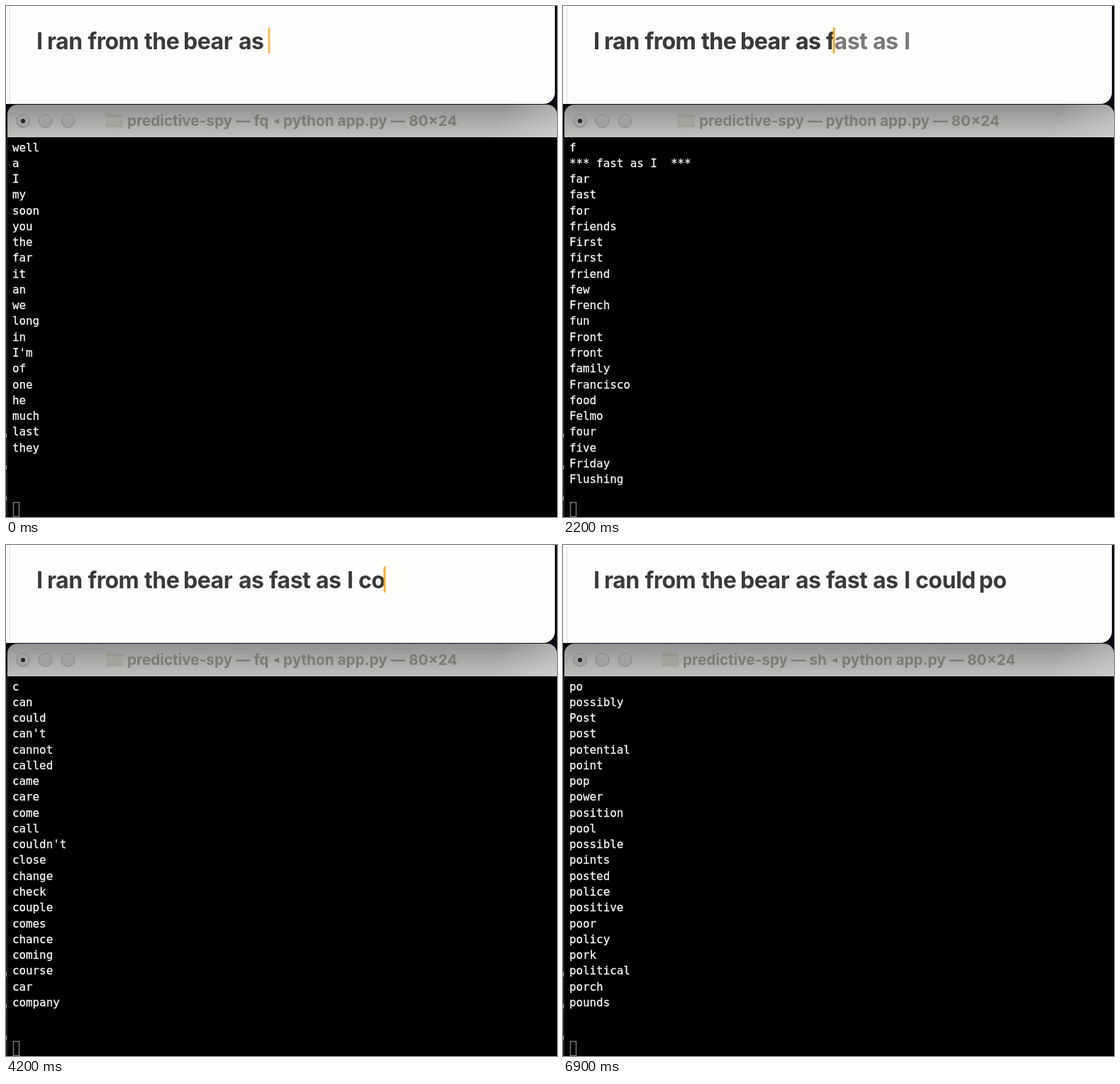
An HTML page with a canvas for the animation above (7000 ms loop, 777 by 720 pixels).

```html
<!DOCTYPE html>
<html lang="en">
<head>
<meta charset="utf-8">
<title>Predictive typing</title>
<style>
  html, body { margin: 0; width: 100%; height: 100%; overflow: hidden; background: #000; }
  canvas { display: block; }
</style>
</head>
<body>
<canvas id="stage" width="777" height="720"></canvas>
<script>
const ctx = document.getElementById('stage').getContext('2d');
const LOOP = 7000;
const SANS = 'Inter, "Open Sans", sans-serif';
const MONO = '"DejaVu Sans Mono", "Noto Sans Mono", monospace';
const WORD_X = [45, 60, 115.5, 195, 252, 329, 371, 438, 483, 498, 588.5];
const START = 'I ran from the bear as';

// Each entry holds from its time until the next one.
const typing = [
  { at: 0, text: START, caret: 371, blink: -470 },
  { at: 400, text: START + ' f', caret: 382, blink: 400 },
  { at: 700, text: START + ' fast as I', caret: 382, blink: 800, ghost: true },
  { at: 2600, text: START + ' fast as I', caret: 496, blink: 2600 },
  { at: 3200, text: START + ' fast as I c', caret: 514, blink: 3100 },
  { at: 4100, text: START + ' fast as I co', caret: 534, blink: 4100 },
  { at: 4300, text: START + ' fast as I could', caret: 534, blink: 4300, ghost: true },
  { at: 4540, text: START + ' fast as I could', caret: 587.5, blink: 4540 },
  { at: 5600, text: START + ' fast as I could p', caret: 606, blink: 5600 },
  { at: 6300, text: START + ' fast as I could po', caret: 627, blink: 6300 }
];

const words = s => s.split(' ');
const lists = [
  { at: 0, rows: words("well a I my soon you the far it an we long in I'm of one he much last they") },
  { at: 700, rows: ['f', '*** fast as I  ***', ...words('far fast for friends First first friend few French fun Front front family Francisco food Felmo four five Friday Flushing')] },
  { at: 3000, rows: words('can could was am have would had will want did do think get just need should know love go see') },
  { at: 3400, rows: words("c can could can't cannot called came care come call couldn't close change check couple comes chance coming course car company") },
  { at: 4300, rows: ['co', '*** could  ***', ...words("come couldn't Cook continue completely contact couple control cost Connected cool comes computer coming course cold company color College")] },
  { at: 5200, rows: words('not have be get do go see to and I find make possibly just use take help tell come the') },
  { at: 5800, rows: words('p possibly please pick put play probably pay plan Post Park point people place pretty past picture playing price part phone') },
  { at: 6500, rows: words('po possibly Post post potential point pop power position pool possible points posted police positive poor policy pork political porch pounds') }
];

const titles = [
  { at: 0, child: 'fq' },
  { at: 1500, child: '' },
  { at: 2700, child: 'sh' },
  { at: 2800, child: 'fq' },
  { at: 4500, child: '' },
  { at: 5200, child: 'fq' },
  { at: 6500, child: 'sh' }
];

const current = (track, t) => track.filter(step => step.at <= t).pop();

function box(x, y, w, h, color, radii = 0) {
  ctx.fillStyle = color;
  ctx.beginPath();
  ctx.roundRect(x, y, w, h, radii);
  ctx.fill();
}

function disc(x, y, r, color, edge) {
  ctx.fillStyle = color;
  ctx.beginPath();
  ctx.arc(x, y, r, 0, Math.PI * 2);
  ctx.fill();
  if (edge) {
    ctx.strokeStyle = edge;
    ctx.lineWidth = 1;
    ctx.stroke();
  }
}

// Places the visible left edge of the first letter at x.
function inkText(text, x, y) {
  ctx.fillText(text, x + ctx.measureText(text).actualBoundingBoxLeft, y);
}

function gradient(x0, y0, x1, y1, ...stops) {
  const g = ctx.createLinearGradient(x0, y0, x1, y1);
  stops.forEach((color, i) => g.addColorStop(i / (stops.length - 1), color));
  return g;
}

function drawSentence(text, color) {
  ctx.fillStyle = color;
  words(text).forEach((word, i) => inkText(word, WORD_X[i], 61));
}

function caretAlpha(age) {
  const phase = ((age % 1000) + 1000) % 1000;
  if (phase < 450) return 1;
  if (phase < 550) return 1 - (phase - 450) / 100;
  return phase < 900 ? 0 : (phase - 900) / 100;
}

function drawEditor(t) {
  box(0, 0, 774, 138, '#fdfdfc', [0, 0, 16, 0]);
  box(0, 0, 5, 138, '#fafaf9');
  box(5, 0, 1, 138, '#dededd');

  const { text, caret, blink, ghost } = current(typing, t);
  ctx.font = '700 32px ' + SANS;
  ctx.letterSpacing = '-0.5px';
  drawSentence(text, ghost ? '#787877' : '#3a3a3a');
  if (ghost) {
    // The part left of the caret is already typed.
    ctx.save();
    ctx.beginPath();
    ctx.rect(0, 0, caret, 138);
    ctx.clip();
    drawSentence(text, '#3a3a3a');
    ctx.restore();
  }
  ctx.letterSpacing = '0px';

  ctx.globalAlpha = caretAlpha(t - blink);
  box(caret - 1.5, 30, 3, 37, '#f5ad2d', 1.5);
  ctx.globalAlpha = 1;
}

function drawFolder(x) {
  box(x, 151, 11, 6, '#969690', 2);
  box(x, 153, 24, 18, '#969690', 2);
  box(x, 157, 24, 14, '#a3a39d', 2);
}

function drawTitleBar(t) {
  box(2, 139, 775, 46, gradient(0, 139, 0, 185, '#8f9091', '#a9a9a8', '#c0c0be'), [14, 14, 0, 0]);
  box(690, 139, 87, 46, gradient(700, 150, 777, 184, 'rgba(214,214,212,0)', 'rgba(214,214,212,.55)'), [0, 14, 0, 0]);

  [24, 55.5, 87.5].forEach(x => disc(x, 162, 9.3, '#a0a1a0', '#858685'));
  disc(24, 162, 3, '#252525');

  const { child } = current(titles, t);
  const left = { fq: 172, sh: 170, '': 193 }[child];
  const tail = 'python app.py — 80×24';
  drawFolder(left - 31);
  ctx.font = '700 20.7px ' + SANS;
  ctx.fillStyle = '#7b7c75';
  if (!child) {
    inkText('predictive-spy — ' + tail, left, 168.5);
    return;
  }
  const right = child === 'fq' ? 392 : 394;
  inkText('predictive-spy — ' + child, left, 168.5);
  inkText(tail, right, 168.5);
  ctx.beginPath();
  ctx.moveTo(right - 15, 162.5);
  ctx.lineTo(right - 7, 158.5);
  ctx.lineTo(right - 7, 166.5);
  ctx.fill();
}

function drawTerminal(t) {
  box(0, 185, 777, 535, '#000');
  box(0, 185, 1, 535, '#101010');
  box(1, 185, 1, 535, '#303030');
  [605, 650, 694].forEach(y => box(0, y - 3, 1, 6, '#a0a09c'));

  ctx.font = '15.83px ' + MONO;
  ctx.fillStyle = ctx.strokeStyle = '#f6f6f3';
  ctx.lineWidth = 0.3;
  current(lists, t).rows.forEach((row, i) => {
    const y = Math.round(204.5 + i * 22.27);
    ctx.fillText(row, 9, y);
    ctx.strokeText(row, 9, y);
  });

  ctx.strokeStyle = '#777';
  ctx.lineWidth = 1.5;
  ctx.strokeRect(10.5, 699.5, 8, 20);
}

function draw(now) {
  const t = now % LOOP;
  box(0, 0, 777, 720, '#0b0b12');
  drawEditor(t);
  drawTitleBar(t);
  drawTerminal(t);
  requestAnimationFrame(draw);
}

draw(performance.now());
</script>
</body>
</html>
```
